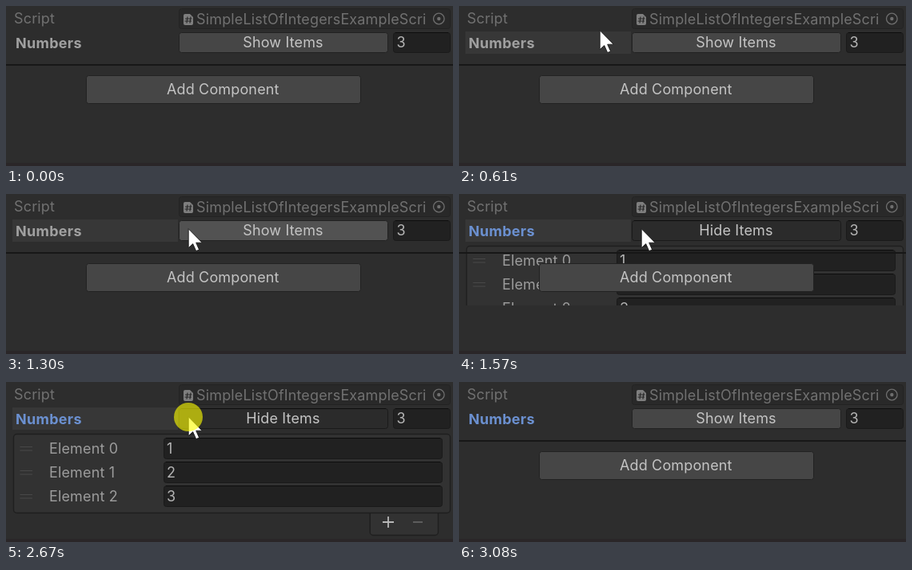
Write an HTML page that moves like this. It is 559 px wide and 201 px high and loops after 3.41 s.

```html
<!DOCTYPE html>
<html lang="en">
<head>
<meta charset="utf-8">
<title>List inspector</title>
<style>
  html, body { margin: 0; width: 100%; height: 100%; overflow: hidden; background: #2d2d2d; }
  svg { display: block; width: 559px; height: 201px; }
  text { font: 18px Inter, sans-serif; letter-spacing: .15px; fill: #c4c4c4; white-space: pre; }
  .mid { text-anchor: middle; }
  .dim { fill: #717171; }
  .label { fill: #9c9c9c; }
  .value { fill: #b4b4b4; }
  .field { fill: #212121; stroke: #1a1a1a; }
  .edge { stroke: #0d0d0d; }
  .button { fill: #464646; stroke: #222; }
  .panel { fill: #323232; stroke: #1f1f1f; stroke-width: 1.4; }
  #name { font-weight: 700; letter-spacing: .28px; }
</style>
</head>
<body>
<svg viewBox="0 0 559 201">
  <defs>
    <clipPath id="reveal"><rect id="window" width="559" height="0"/></clipPath>
    <clipPath id="scriptBox"><rect x="236" y="0" width="288.5" height="32"/></clipPath>
  </defs>
  <rect width="559" height="201" fill="#2d2d2d"/>
  <rect y="197" width="559" height="4" fill="#2a2628"/>

  <text class="dim" x="10" y="22">Script</text>
  <rect x="216.5" y="3.5" width="339" height="25" rx="3" fill="#292929" stroke="#232323"/>
  <path d="M224 10h6l4 4v8q0 2-2 2h-8q-2 0-2-2v-10q0-2 2-2z" fill="#7e7e7e"/>
  <path d="M227 13.5l-1 8M231 13.5l-1 8M224 16h8.5M223.5 19h8.5" fill="none" stroke="#292929" stroke-width="1.2"/>
  <text class="dim" x="238" y="23" clip-path="url(#scriptBox)">SimpleListOfIntegersExampleScript</text>
  <circle cx="541.3" cy="16" r="6.8" fill="none" stroke="#6e6e6e" stroke-width="1.3"/>
  <circle cx="541.3" cy="16" r="2.2" fill="#6e6e6e"/>

  <rect id="row" x="8" y="32" width="207" height="28" fill="#373737"/>
  <text id="name" x="12" y="53">Numbers</text>
  <rect id="toggle" x="216.5" y="33.5" width="261" height="25" rx="3"/>
  <path id="toggleEdge" class="edge" d="M219 33.5h256"/>
  <text id="caption" class="mid" x="346.5" y="52"></text>
  <rect class="field" x="484.5" y="33.5" width="71" height="25" rx="3"/>
  <path class="edge" d="M487 33.5h66"/>
  <text class="value" x="488.5" y="52">3</text>

  <g id="list" clip-path="url(#reveal)">
    <rect class="panel" x="455.2" y="160" width="85.3" height="32.5" rx="4"/>
    <rect class="panel" x="9.5" y="65.5" width="546" height="99" rx="4"/>
    <path d="M471 176h14M478 169v14" stroke="#b8b8b8" stroke-width="1.8"/>
    <path d="M509 176h12" stroke="#626262" stroke-width="1.8"/>
  </g>

  <g id="below">
    <path d="M0 74h559" stroke="#171717" stroke-width="2"/>
    <rect class="button" x="100.5" y="87.5" width="343" height="35" rx="3"/>
    <text class="mid" x="271.3" y="111">Add Component</text>
  </g>

  <path id="cursor" d="M-.8-.3V23.7L4.7 18.6L8.7 27.6L12.6 26L8.7 17.2H16.3Z"
        fill="#fff" stroke="#1a1a1a" stroke-width=".9" stroke-linejoin="round"/>
  <circle id="press" cx="228" cy="44" r="18" fill="#ff0" fill-opacity=".61"/>
</svg>
<script>
const LOOP = 3410;
const $ = id => document.getElementById(id);

// Pointer tip: [time, x, y]; no position means the pointer is off stage.
const pointer = [
  [0], [470, 42, 57], [540, 122, 38], [610, 177, 31], [680, 200, 33],
  [750, 212, 36], [820, 218, 39], [890, 221, 41], [960, 223, 43],
  [1030, 228, 43], [1300, 229, 44], [2880, 205, 51], [2950, 122, 69],
  [3010, 32, 92], [3080]
];

// List state: [time, visible bottom edge, open, pressed, selected].
const states = [
  [0, 0, 0, 0, 0], [1500, 0, 0, 1, 0], [1570, 140, 1, 0, 1], [1640, 201, 1, 0, 1],
  [2670, 201, 1, 1, 1], [2740, 140, 0, 0, 1], [2810, 0, 0, 0, 1]
];

function add(parent, tag, attrs, text = "") {
  const el = document.createElementNS("http://www.w3.org/2000/svg", tag);
  for (const key in attrs) el.setAttribute(key, attrs[key]);
  el.textContent = text;
  parent.append(el);
}

for (let i = 0; i < 3; i++) {
  const y = 30 * i, list = $("list");
  add(list, "path", { d: `M17.5 ${y + 81.5}h15.5M17.5 ${y + 86}h15.5`, stroke: "#484848" });
  add(list, "text", { class: "label", x: 54, y: y + 90 }, `Element ${i}`);
  add(list, "rect", { class: "field", x: 197.5, y: y + 70.5, width: 348, height: 26, rx: 3 });
  add(list, "path", { class: "edge", d: `M200 ${y + 70.5}h343` });
  add(list, "text", { class: "value", x: 201, y: y + 90 }, i + 1);
}

const at = (table, t) => table.findLast(step => step[0] <= t);
const show = (id, on) => { $(id).style.display = on ? "" : "none"; };

function draw(t) {
  const [, x, y] = at(pointer, t);
  const [, bottom, open, pressed, selected] = at(states, t);
  const inside = x !== undefined;
  const overRow = inside && x >= 8 && y >= 31 && y < 60;
  const overButton = overRow && x >= 216;

  show("cursor", inside);
  if (inside) $("cursor").setAttribute("transform", `translate(${x} ${y})`);
  show("press", pressed);
  show("row", overRow);
  show("list", bottom > 0);
  show("below", bottom < 201);
  show("toggleEdge", open);
  $("window").setAttribute("height", bottom);
  $("name").style.fill = selected ? "#6b90d0" : "#a0a0a0";
  $("caption").textContent = open ? "Hide Items" : "Show Items";
  $("toggle").style.fill = open ? "#2b2b2b" : overButton ? "#525252" : "#464646";
  $("toggle").style.stroke = open ? "#1a1a1a" : "#222";
}

function tick() {
  draw(performance.now() % LOOP);
  requestAnimationFrame(tick);
}
tick();
</script>
</body>
</html>
```
